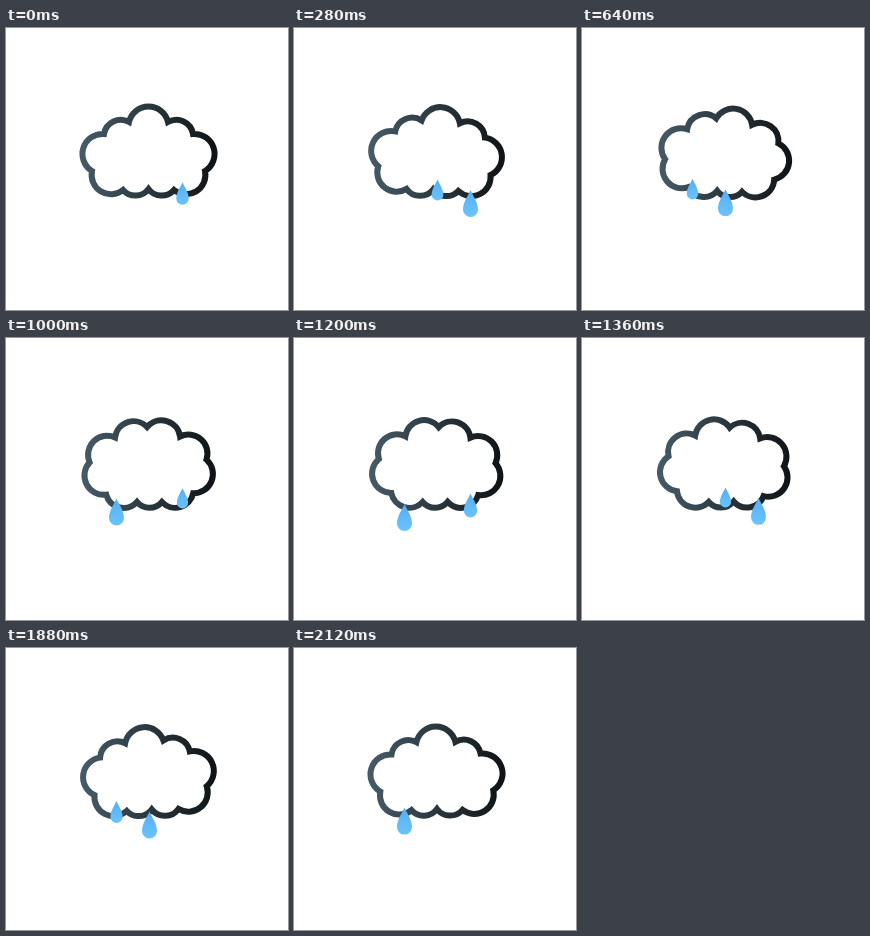
An HTML page for the animation above (2160 ms loop, 282 by 282 pixels).

```html
<!DOCTYPE html>
<html>
<head>
<meta charset="utf-8">
<style>
  html, body { margin: 0; height: 100%; overflow: hidden; background: #fff; }
  svg { display: block; width: 100vw; height: 100vh; }
</style>
</head>
<body>
<svg viewBox="0 0 282 282">
  <defs>
    <linearGradient id="ink" gradientUnits="userSpaceOnUse" x1="78" y1="0" x2="207" y2="0">
      <stop stop-color="#455a66"/>
      <stop offset="1" stop-color="#101416"/>
    </linearGradient>
    <linearGradient id="water" x1="0" y1="0" x2="0" y2="1">
      <stop stop-color="#56aef2"/>
      <stop offset="1" stop-color="#6bc3fc"/>
    </linearGradient>
  </defs>
  <path id="cloud" fill="none" stroke="url(#ink)" stroke-width="6"/>
  <g id="rain" fill="url(#water)"></g>
</svg>
<script>
const LOOP = 2160, STEP = 40, BUMPS = 9;
const cloud = document.getElementById('cloud');
const rain = document.getElementById('rain');

// Closed track followed by the notches between bumps, two points per bump
const track = [
  [123, 94], [142.5, 89], [162, 94], [175, 99], [187, 106], [201, 123],
  [199, 143], [186, 156], [168, 162], [155, 164], [142.5, 161], [130, 164],
  [117, 162], [99, 156], [86, 143], [84, 123], [98, 106], [110, 99]
];

// Drop height by age in ms
const growth = [[0, 4], [45, 12], [110, 20], [290, 22.5], [430, 27], [740, 27], [815, 18], [855, 0]];

const columns = [176.5, 143.5, 110.5];
const drops = Array.from({ length: 6 }, (_, i) => {
  const el = document.createElementNS('http://www.w3.org/2000/svg', 'path');
  el.setAttribute('d', 'M0 0C2 5 7.5 12 7.5 19.5A7.5 7.5 0 0 1-7.5 19.5C-7.5 12-2 5 0 0Z');
  rain.append(el);
  return { el, x: columns[i % 3], birth: 385 * i - 290 };
});

// Catmull-Rom point on the track
function notch(s) {
  const n = track.length, i = Math.floor(s), u = s - i;
  const [a, b, c, d] = [-1, 0, 1, 2].map(k => track[(i + k + n) % n]);
  return [0, 1].map(k => b[k] + u / 2 * (c[k] - a[k]
    + u * (2 * a[k] - 5 * b[k] + 4 * c[k] - d[k]
    + u * (3 * (b[k] - c[k]) + d[k] - a[k]))));
}

function outline(phase) {
  const pts = Array.from({ length: BUMPS }, (_, i) => notch(2 * (i + phase)));
  return 'M' + pts[0] + pts.map((p, i) => {
    const q = pts[(i + 1) % BUMPS];
    const r = 9.5 + 0.27 * Math.hypot(q[0] - p[0], q[1] - p[1]);
    return `A${r} ${r} 0 0 1 ${q}`;
  }).join('') + 'Z';
}

function height(age) {
  const i = growth.findIndex(g => g[0] > age);
  if (i < 1) return 0;
  const [t0, h0] = growth[i - 1], [t1, h1] = growth[i];
  return h0 + (h1 - h0) * (age - t0) / (t1 - t0);
}

function draw(now) {
  const t = Math.floor(now % LOOP / STEP) * STEP;
  cloud.setAttribute('d', outline(t / LOOP));
  for (const { el, x, birth } of drops) {
    const age = t - birth, h = height(age);
    el.style.display = h ? '' : 'none';
    el.setAttribute('transform', `translate(${x} ${146.5 + 0.027 * age}) scale(${h / 27})`);
  }
}

const start = performance.now();
function tick() {
  draw(performance.now() - start);
  requestAnimationFrame(tick);
}
tick();
</script>
</body>
</html>
```
